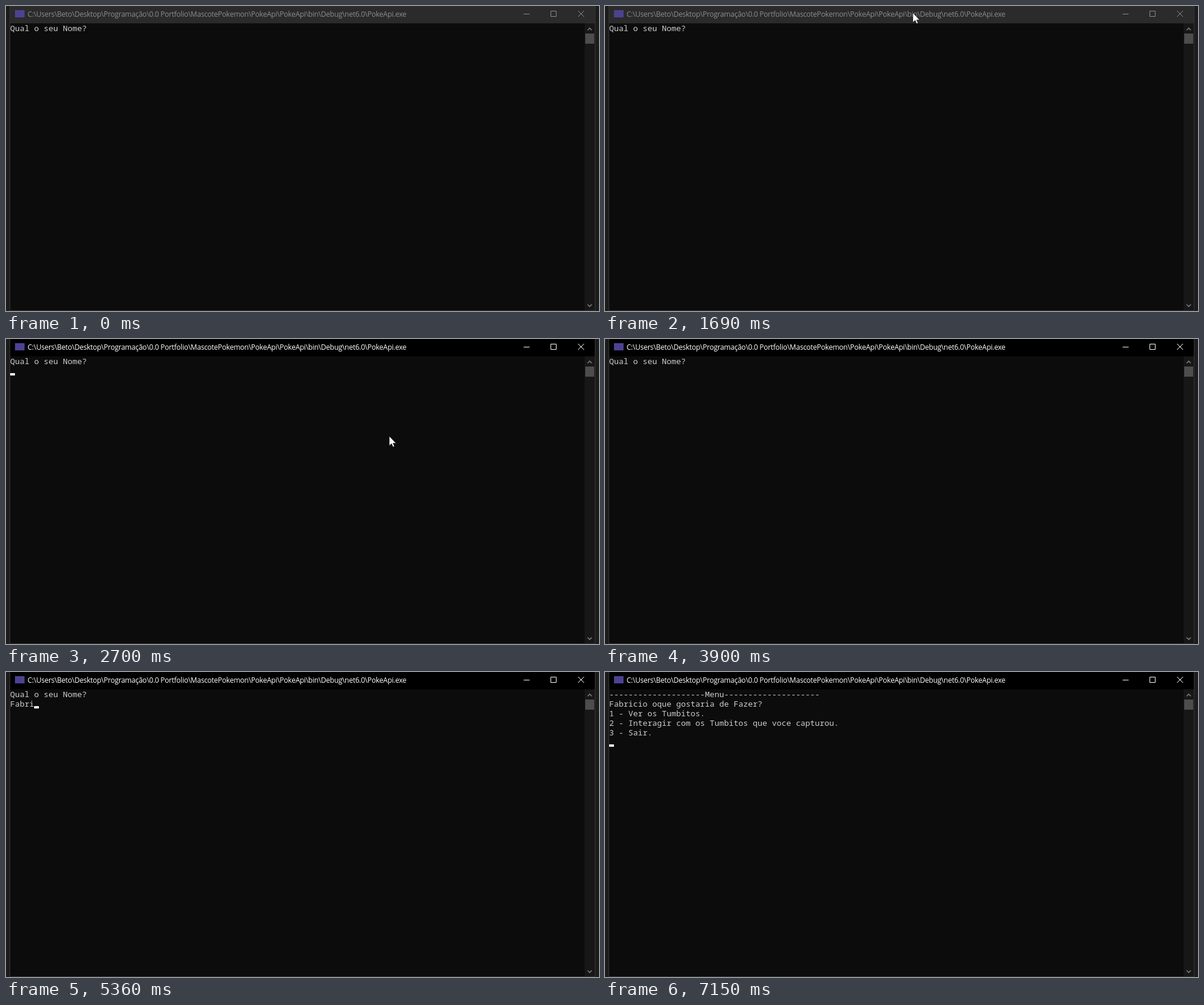
Animation of 991x510 px, one loop 8000 ms. Source, as an HTML page:

```html
<!DOCTYPE html>
<html lang="pt">
<head>
<meta charset="utf-8">
<title>Console</title>
<style>
  html, body { margin: 0; width: 100%; height: 100%; overflow: hidden; background: #1c1c1c; }
  svg { display: block; width: 100%; height: 100%; }
  .title { font: 12px "Open Sans", sans-serif; letter-spacing: -.24px; }
  .line { font: 13.333px "Noto Sans Mono", monospace; fill: #ccc; white-space: pre; }
  .crisp { shape-rendering: crispEdges; }
</style>
</head>
<body>
<svg viewBox="0 0 991 510">
  <g class="crisp">
    <rect width="991" height="510" fill="#1c1c1c"/>
    <rect x="6" width="979" height="510" fill="#363636"/>
    <rect x="7" y="29" width="977" height="480" fill="#0c0c0c"/>
    <rect x="967" y="29" width="17" height="480" fill="#171717"/>
    <rect x="968" y="46" width="15" height="17" fill="#4d4d4d"/>
    <rect id="bar" x="7" width="977" height="29"/>
    <rect x="15" y="7" width="16" height="12" fill="#4c4292"/>
  </g>
  <path d="M972 40.5l3.5-3.5 3.5 3.5M972 499l3.5 3.5 3.5-3.5" fill="none" stroke="#7c7c7c" stroke-width="1.6"/>
  <text id="title" class="title" x="36" y="18">C:\Users\Beto\Desktop\Programação\0.0 Portfolio\MascotePokemon\PokeApi\PokeApi\bin\Debug\net6.0\PokeApi.exe</text>
  <path id="buttons" d="M865 13.5h10M910.5 8.5h9v9h-9zM956 8l10 10M966 8l-10 10" fill="none"/>
  <g id="lines"></g>
  <rect id="caret" class="crisp" width="8" height="4" fill="#f2f2f2"/>
  <circle id="click" cx="514" cy="9" r="12" fill="#ff0" opacity=".5"/>
  <path id="mouse" d="M.5.5v16l3.7-3.5 2.6 5.6 2.4-1.1-2.5-5.3h5z" fill="#fff" stroke="#000" stroke-width=".6"/>
</svg>
<script>
const LOOP = 8000, FOCUS = 1760, CLICK_END = 1890, MENU_AT = 7150;
const NAME = "Fabricio";
const QUESTION = "Qual o seu Nome?";
const dashes = "-".repeat(20);
const MENU = [
  dashes + "Menu" + dashes,
  NAME + " oque gostaria de Fazer?",
  "1 - Ver os Tumbitos.",
  "2 - Interagir com os Tumbitos que voce capturou.",
  "3 - Sair."
];
const keyTimes = [4500, 4830, 5030, 5230, 5360, 5620, 5950, 6220];
const blinkTimes = [2290, 2840, 3370, 3900, 4430, 4960, 5490, 6020, 6550, 7080];

// Pointer: sampled glides with an ease-out power per axis, then held positions.
const glides = [
  { from: 580, to: 930, a: [699, 355], b: [558, 72], pow: [2, 1.2] },
  { from: 930, to: 1350, a: [558, 72], b: [551, 27], pow: [1, 1] },
  { from: 1350, to: 1560, a: [551, 27], b: [516, 13], pow: [1, 1] }
];
const holds = [
  [1560, 516, 13], [1690, 514, 11], [1760, 514, 7], [1890, 514, 9],
  [2090, 514, 16], [2700, 640, 162], [2770, 870, 438]
];
const POINTER_IN = 580, POINTER_OUT = 2840, SAMPLE = 70;

const $ = id => document.getElementById(id);
const set = (el, attrs) => {
  for (const k in attrs) el.setAttribute(k, attrs[k]);
};
const show = (el, on) => set(el, { visibility: on ? "visible" : "hidden" });

const rowTop = r => 29 + 16 * r;
const rows = MENU.map((_, r) => {
  const el = document.createElementNS("http://www.w3.org/2000/svg", "text");
  set(el, { class: "line", x: 7, y: rowTop(r) + 13 });
  $("lines").append(el);
  return el;
});

function pointerAt(t) {
  if (t < POINTER_IN || t >= POINTER_OUT) return null;
  if (t >= holds[0][0]) return holds.filter(h => h[0] <= t).pop().slice(1);
  const s = POINTER_IN + SAMPLE * Math.floor((t - POINTER_IN) / SAMPLE);
  const g = glides.find(g => s < g.to);
  const u = (s - g.from) / (g.to - g.from);
  return g.a.map((v, i) => Math.round(v + (g.b[i] - v) * (1 - (1 - u) ** g.pow[i])));
}

// A key press turns the caret on; each blink tick toggles it.
function caretOn(t) {
  if (t >= MENU_AT) return true;
  const lastKey = keyTimes.filter(k => k <= t).pop() || 0;
  const toggles = blinkTimes.filter(b => b > lastKey && b <= t).length;
  return (toggles % 2 === 1) !== (lastKey > 0);
}

function render(t) {
  const active = t >= FOCUS, menu = t >= MENU_AT;
  set($("bar"), { fill: active ? "#000" : "#2b2b2b" });
  set($("title"), { fill: active ? "#fff" : "#8c8c8c" });
  set($("buttons"), { stroke: active ? "#fff" : "#8c8c8c" });

  const typed = keyTimes.filter(k => k <= t).length;
  const text = menu ? MENU : [QUESTION, NAME.slice(0, typed)];
  rows.forEach((el, r) => { el.textContent = text[r] || ""; });

  set($("caret"), { x: 7 + (menu ? 0 : 8 * typed), y: rowTop(menu ? 5 : 1) + 12 });
  show($("caret"), caretOn(t));

  show($("click"), t >= FOCUS && t < CLICK_END);
  const p = pointerAt(t);
  show($("mouse"), p);
  if (p) set($("mouse"), { transform: `translate(${p})` });
}

const start = performance.now();
function tick() {
  render((performance.now() - start) % LOOP);
  requestAnimationFrame(tick);
}
tick();
</script>
</body>
</html>
```
